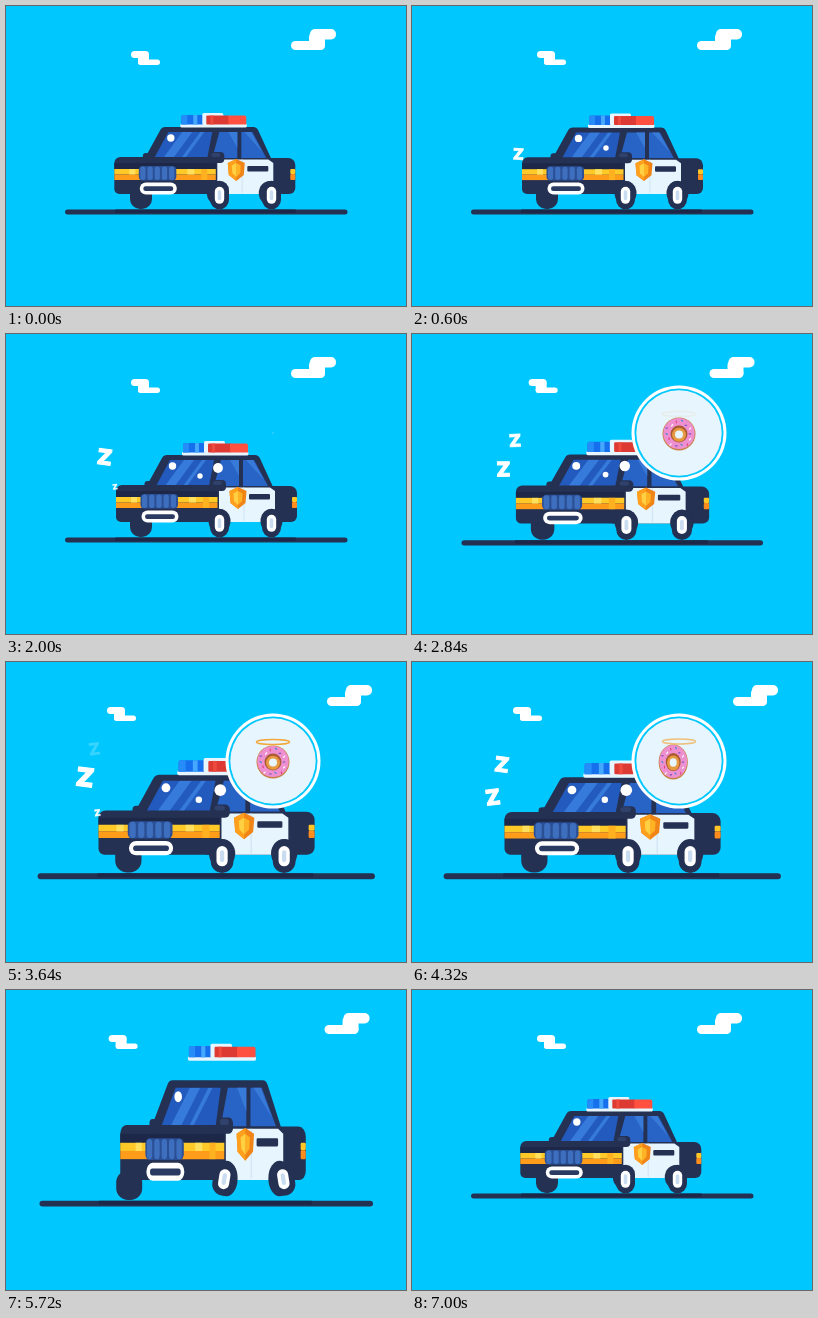
Recreate the animation shown at these times as an HTML page with a canvas. Size 400 px wide and 300 px high, loop 7040 ms.

```html
<!DOCTYPE html>
<html>
<head>
<meta charset="utf-8">
<style>
html, body { margin: 0; width: 100%; height: 100%; overflow: hidden; background: #00c8ff; }
canvas { display: block; width: 400px; height: 300px; }
</style>
</head>
<body>
<canvas id="stage" width="400" height="300"></canvas>
<script>
const c = document.getElementById('stage').getContext('2d');
const LOOP = 7040, STEP = 40, TAU = Math.PI * 2;
const NAVY = '#253153', DARK = '#1d2848', SKY = '#00c8ff', PALE = '#e6f5fe';

const clamp = v => Math.max(0, Math.min(1, v));
const prog = (t, a, b) => clamp((t - a) / (b - a));
const smooth = p => p * p * (3 - 2 * p);
const cubic = p => p < .5 ? 4 * p ** 3 : 1 - (2 - 2 * p) ** 3 / 2;
const back = p => 1 + 2.7 * (p - 1) ** 3 + 1.7 * (p - 1) ** 2;

// eased value from [time, value] pairs
function keys(t, list) {
  if (t <= list[0][0]) return list[0][1];
  for (let i = 1; i < list.length; i++) {
    const [t0, v0] = list[i - 1], [t1, v1] = list[i];
    if (t < t1) return v0 + (v1 - v0) * smooth((t - t0) / (t1 - t0));
  }
  return list[list.length - 1][1];
}

function box(x0, y0, x1, y1, color, r = 0) {
  c.fillStyle = color;
  c.beginPath();
  c.roundRect(x0, y0, x1 - x0, y1 - y0, r);
  c.fill();
}

function poly(color, ...p) {
  c.fillStyle = color;
  c.beginPath();
  for (let i = 0; i < p.length; i += 2) c.lineTo(p[i], p[i + 1]);
  c.closePath();
  c.fill();
}

function oval(x, y, rx, ry, color) {
  if (rx <= 0 || ry <= 0) return;
  c.fillStyle = color;
  c.beginPath();
  c.ellipse(x, y, rx, ry, 0, 0, TAU);
  c.fill();
}

function group(draw) {
  c.save();
  draw();
  c.restore();
}

function clouds(z) {
  const l = -24 * z, r = 36 * z;
  box(125 + l, 45, 143 + l, 52, '#fff', 3.5);
  box(132 + l, 47, 143 + l, 59, '#fff', 3.5);
  box(132 + l, 53.5, 154 + l, 59, '#fff', 2.7);
  box(304 + r, 23, 330 + r, 33.5, '#fff', 5);
  box(303 + r, 26, 319 + r, 44, '#fff', 5);
  box(285 + r, 35, 319 + r, 44, '#fff', 4.5);
}

function wheel() {
  box(-9.5, -14.5, 9.5, 14, NAVY, 9.5);
  box(-4.7, -8.5, 4.7, 8.5, '#fff', 4.7);
  box(-1.8, -5, 1.8, 5, '#c9dcf0', 1.8);
}

function lightBar() {
  box(176, 117.5, 242.5, 121.5, PALE, 1.5);
  box(177, 109, 199, 118.5, '#1670ee', [2, 0, 0, 0]);
  box(177, 109, 183, 118.5, '#268df8', [2, 0, 0, 0]);
  box(189, 109, 193, 118.5, '#45a8ff');
  box(198, 107, 219, 119, PALE, 1.5);
  box(202, 109.5, 225, 118.5, '#dd3a33', 1);
  box(206, 109.5, 209, 118.5, '#ee4a3d');
  box(224, 109.5, 242, 118.5, '#ff5040', [0, 2, 0, 0]);
}

function cabin() {
  c.fillStyle = NAVY;
  c.beginPath();
  c.moveTo(139, 155);
  c.lineTo(156, 124);
  c.quadraticCurveTo(157.5, 121, 161, 121);
  c.lineTo(249, 121);
  c.quadraticCurveTo(252.5, 121, 254, 124.5);
  c.lineTo(268, 155);
  c.fill();

  group(() => {
    c.beginPath();
    c.moveTo(164, 126);
    c.lineTo(208, 126);
    c.lineTo(203, 152);
    c.lineTo(150, 152);
    c.clip();
    box(146, 124, 210, 153, '#235abd');
    poly('#367bdc', 178, 126, 188, 126, 169, 152, 159, 152);
    poly('#367bdc', 196, 126, 200, 126, 181, 152, 177, 152);
  });
  poly('#2863c6', 215, 126, 233, 126, 233, 152, 208, 152);
  poly('#387ad8', 224, 126, 233, 126, 233, 142);
  poly('#2863c6', 237, 126, 248, 126, 262, 152, 237, 152);
  poly('#387ad8', 240, 126, 247, 126, 258, 146);
  oval(166.5, 132, 3.7, 3.7, '#fff');
}

function badge() {
  poly('#f08416', 232, 153, 240.5, 157, 239.5, 169, 232, 175, 224.5, 169, 223.5, 157);
  poly('#ff9f1c', 232, 153, 232, 175, 224.5, 169, 223.5, 157);
  poly('#ffb324', 232, 157, 236.5, 159.5, 236, 167, 232, 171);
  poly('#ffd042', 232, 157, 232, 171, 228, 167, 227.5, 159.5);
}

function body() {
  box(200, 152, 291, 188, NAVY, [0, 7, 6, 0]);
  box(286, 163, 291, 168, '#ffc627', 1);
  box(286, 168, 291, 174, '#ff8d1e', 1);
  poly(PALE, 213, 153.5, 264, 153.5, 269, 157, 269, 188, 213, 188);
  box(237.3, 153.5, 238.5, 187, '#d3e6f5');
  box(243, 160, 264, 165.5, NAVY, 1);
  oval(213.5, 187, 11, 12, NAVY);
  oval(265.5, 187, 11, 12, NAVY);
  badge();

  box(110, 151, 211.5, 188, NAVY, [6, 4, 5, 5]);
  box(110, 157, 211.5, 163.5, DARK);
  box(110, 163, 138, 168.5, '#ffca28');
  box(110, 168.5, 138, 174, '#ff9d1b');
  box(168, 163, 211.5, 168.5, '#ffca28');
  box(168, 168.5, 211.5, 174, '#ff9d1b');
  box(125, 163, 131, 168.5, '#ffe05c');
  box(183, 163, 190, 168.5, '#ffe05c');
  box(197, 163, 203, 174, '#ffb11f');
  box(134.5, 160, 172, 174.5, '#2a4f95', 4);
  for (let i = 0; i < 5; i++) box(136 + i * 7.2, 160.5, 141.2 + i * 7.2, 174, '#3e6fbe', 2.5);
  box(135.5, 176.5, 172.5, 188.5, '#fff', 6);
  box(139, 180.3, 169, 185, '#2b3a61', 2.4);
  box(138.5, 147, 149, 154, NAVY, 3);
  box(206, 146, 220, 157, NAVY, 4);
  box(207, 147, 216, 151, '#30426b', 2);
}

function car(t) {
  const k = keys(t, [[4880, 0], [5000, -.23], [5300, -.6], [5470, 1], [5740, 1],
    [5900, -.4], [6060, .2], [6220, 0]]);
  const asleep = prog(t, 80, 500) * (1 - prog(t, 5760, 6200));
  const breath = asleep * (1 - prog(t, 5100, 5300)) * Math.sin(Math.PI * (t - 360) / 1640) ** 2 * .035;
  const sx = 1 - (k > 0 ? .132 : .015) * k;
  const sy = 1 + .26 * k - breath;
  const lift = 2 * Math.max(0, k);
  const lean = .16 * Math.abs(k);
  const u = (t - 5570) / 190;
  const fly = Math.abs(u) < 1 ? 45 * (1 - u * u) : 0;

  box(124, 178, 146, 203, NAVY, 10);
  group(() => {
    c.translate(242 + 1.7 * (asleep - 1), -lift);
    c.scale(sx, 1);
    c.translate(-242, 0);
    group(() => {
      c.translate(0, 188);
      c.scale(1, sy);
      c.translate(0, -188);
      cabin();
      body();
    });
    c.translate(0, 67 * (1 - sy) - fly);
    lightBar();
  });
  for (const [x, turn] of [[213.5 + lift, lean], [265.5, -lean]]) {
    group(() => {
      c.translate(x, 189.3 - 2 * lift);
      c.rotate(turn);
      wheel();
    });
  }
}

function snores(t) {
  const gone = 1 - prog(t, 5080, 5220);
  for (const born of [310, 1950, 3590]) {
    const a = t - born;
    const alpha = gone * (1 - prog(a, 3080, 3400));
    if (a < 0 || alpha <= 0) continue;
    const x = 103.3 + 7 * Math.cos(TAU * (a + 250) / 3050);
    const y = 153.8 - .02016 * a + 1.147e-6 * a * a;
    const h = keys(a, [[0, 5], [350, 12], [1500, 16], [3050, 10.5]]);
    group(() => {
      c.globalAlpha = alpha;
      c.translate(x, y);
      c.rotate(.13 * Math.sin(TAU * (a - 1540) / 640));
      c.fillStyle = c.strokeStyle = '#fff';
      c.lineWidth = h * .06;
      c.font = `900 ${h / .73}px Inter, "Open Sans", sans-serif`;
      c.textAlign = 'center';
      c.fillText('Z', 0, h / 2);
      if (alpha === 1) c.strokeText('Z', 0, h / 2);
    });
  }
}

function dots(t) {
  const out = 1 - prog(t, 5080, 5220);
  const small = 2.7 * back(prog(t, 380, 620)) * out;
  const big = 4.9 * back(prog(t, 1250, 1600)) * out;
  oval(194, 142, small, small, '#fff');
  oval(212, 134, big, big, '#fff');
}

function donut() {
  oval(0, 0, 16.5, 16.5, '#c98243');
  oval(0, -.5, 15.7, 15.5, '#ee8fcf');
  oval(0, 0, 8.5, 8.5, '#a95a32');
  oval(0, .8, 7, 7, '#e89a43');
  oval(0, .5, 4, 4, PALE);
  const tints = ['#7b55c7', '#fff', '#e0437f', '#4f86d9'];
  for (let i = 0; i < 14; i++) {
    group(() => {
      c.rotate(i * TAU / 14);
      c.translate(11 + i % 3 * 1.3, 0);
      c.rotate(i * 1.9);
      box(-1.4, -.6, 1.4, .6, tints[i % 4], .6);
    });
  }
}

function snack() {
  c.fillStyle = '#efb64d';
  c.beginPath();
  c.moveTo(-3, -23);
  c.lineTo(8, -24);
  c.lineTo(10, 14);
  c.quadraticCurveTo(8, 24, -11, 24);
  c.quadraticCurveTo(-2, 17, -3, 8);
  c.fill();
  for (let i = 0; i < 4; i++) box(-3, -18 + i * 7, 9, -16 + i * 7, '#41332f');
}

function dream(t) {
  const open = keys(t, [[1960, 0], [2040, .02], [2480, 1.05], [2640, 1]]);
  const shut = prog(t, 4800, 5090);
  const r = 47.5 * open * (1 - shut * shut * (1.45 - .45 * shut));
  if (r < .3) return;
  const s = r / 47.5;
  group(() => {
    c.translate(267, 99);
    oval(0, 0, r, r, '#fff');
    if (r > 30) {
      oval(0, 0, r - 3, r - 3, SKY);
      oval(0, 0, r - 4.8, r - 4.8, PALE);
    }
    c.beginPath();
    c.arc(0, 0, Math.max(.1, r - (r > 30 ? 4.8 : 0)), 0, TAU);
    c.clip();
    c.scale(s, s);
    const swap = smooth(prog(t, 4150, 4600));
    const bob = Math.sin((t - 3640) / 260);
    group(() => {
      c.translate(-18 * swap, bob * (1 - swap) + 1 - swap);
      c.scale(1 - .36 * swap, 1 + .2 * swap);
      donut();
    });
    if (swap < 1) {
      c.globalAlpha = prog(t, 2800, 3200) * (1 - swap);
      c.strokeStyle = '#f3a73b';
      c.lineWidth = 1.5;
      c.beginPath();
      c.ellipse(0, -19 - bob, 16.5, 2.5, 0, 0, TAU);
      c.stroke();
      c.globalAlpha = 1;
    }
    if (swap > 0) {
      c.translate(21 + 50 * (1 - swap), 0);
      snack();
    }
  });
}

function draw(t) {
  const z = cubic(prog(t, 2530, 3230)) - cubic(prog(t, 5540, 6240));
  box(0, 0, 400, 300, SKY);
  clouds(z);
  group(() => {
    const s = 1 + .194 * z;
    c.translate(200.2, 164);
    c.scale(s, s);
    c.translate(-200.2, -164);
    box(59, 203.5, 341.5, 208.5, NAVY, 2.5);
    box(109, 203.5, 290, 207, DARK, 1);
    car(t);
    snores(t);
    dots(t);
  });
  dream(t);
}

const start = performance.now();
function tick() {
  const t = (performance.now() - start) % LOOP;
  draw(Math.floor(t / STEP) * STEP);
  requestAnimationFrame(tick);
}
tick();
</script>
</body>
</html>
```
